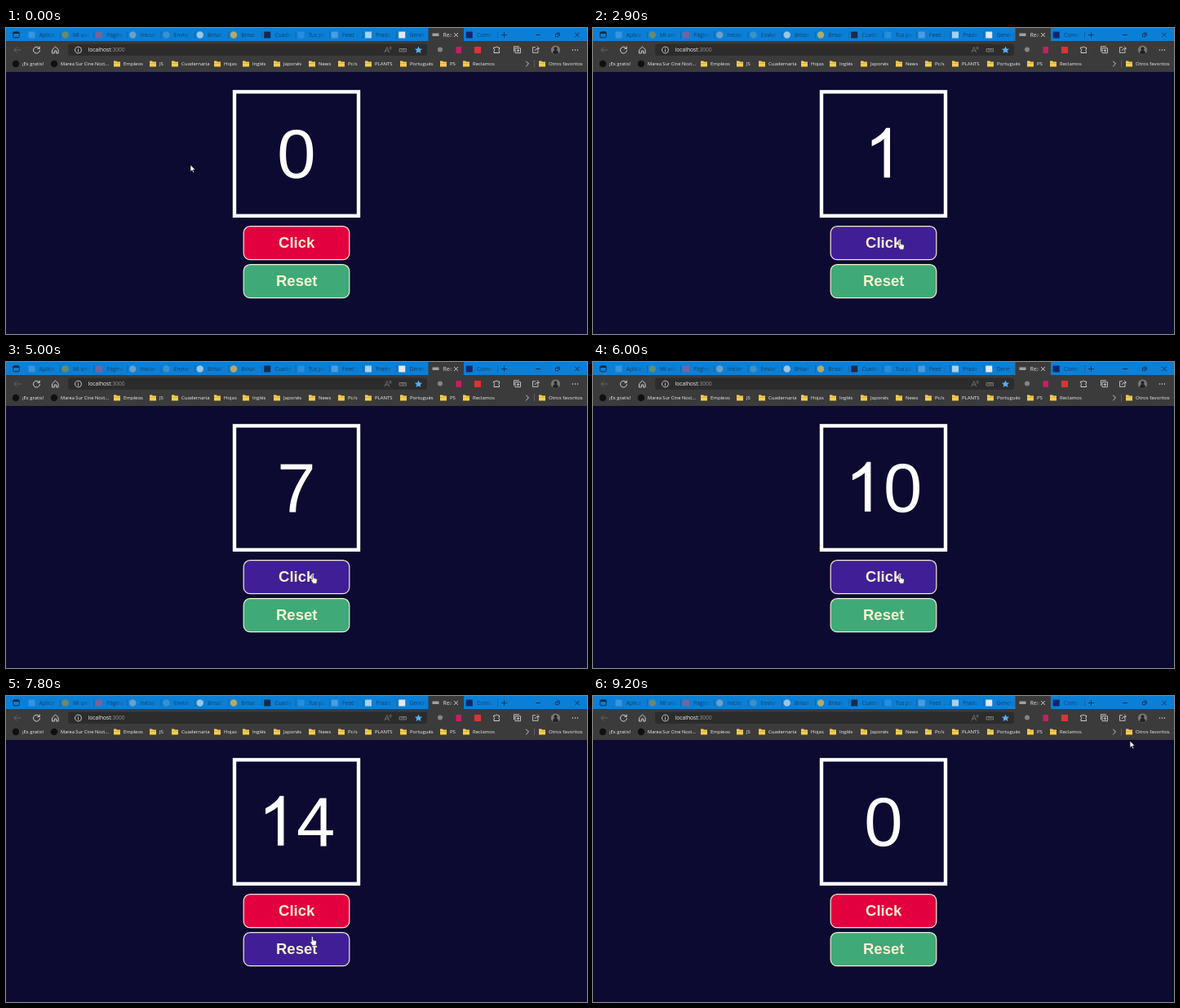
These frames come from a looping animation (712 by 376 pixels, 9.5 s). An HTML page with a canvas:

```html
<!DOCTYPE html>
<html lang="es">
<head>
<meta charset="utf-8">
<title>Contador</title>
<style>
html, body { margin: 0; width: 100%; height: 100%; overflow: hidden; background: #0c0a30; }
canvas { display: block; width: 712px; height: 376px; }
</style>
</head>
<body>
<canvas id="stage" width="712" height="376"></canvas>
<script>
const ctx = document.getElementById('stage').getContext('2d');
const LOOP = 9500, STEP = 100;
const UI = '"Open Sans", "Noto Sans", sans-serif';
const ARIAL = '"Liberation Sans", Arial, sans-serif';
const BLUE = '#0b7fd6', BAR = '#3b3b3b', ICON = '#dedede', DIM = '#858585';

// Moments at which the counter goes up by one
const CLICKS = [2900, 3300, 3500, 4000, 4400, 4500, 5000, 5400, 5600, 6000, 6300, 6600, 6900, 7100];
const RESET_AT = 8500;

// Pointer stops: time, x, y
const PATH = [
  [0, 226, 168], [500, 252.5, 179], [600, 252.5, 179], [700, 253, 179],
  [1200, 253, 179], [1500, 375, 260], [1600, 375, 260], [1700, 376.2, 260.5],
  [7600, 376.2, 260.5], [7900, 375, 307], [8000, 375, 307], [8200, 376.2, 309],
  [8500, 376.2, 309], [9200, 658, 55], [LOOP, 658, 55]
];

const BUTTONS = [
  { label: 'Click', y: 243.5, color: '#e3003f' },
  { label: 'Reset', y: 290.5, color: '#40a978' }
];

// Footless numeral one, in units of 1/2048 em above the baseline
const ONE = new Path2D('M763 0H583V-1147Q518-1085 412-1023T223-930V-1104Q374-1175 487-1276T647-1472H763Z');

// Tabs: label, icon colour, round icon
const TABS = [
  ['Aplica', '#3794df'], ['Mi uni', '#668b70', 1], ['Página', '#7663a0'], ['Iniciar', '#6ba0c6', 1],
  ['Enviar', '#3b91cb', 1], ['Brisal', '#9cc5e4', 1], ['Brisal', '#b3a969', 1], ['Cuader', '#18284f'],
  ['Tus po', '#298ddd'], ['Feed |', '#4b9cde'], ['Prado', '#a6d0f0'], ['Generic', '#e3e8f2'],
  ['Rea', '#a1a1a1'], ['Como', '#12266b']
];
const ACTIVE = 12;

const FOLDERS = [
  [136, 'Empleos'], [180, 'JS'], [207, 'Cuadernaria'], [259, 'Hojas'], [294, 'Inglés'],
  [332, 'Japonés'], [375, 'News'], [411, 'Pc/s'], [444, 'PLANTS'], [487, 'Portugués'],
  [536, 'PS'], [564, 'Reclamos'], [657, 'Otros favoritos']
];

function rect(x, y, w, h, color) {
  ctx.fillStyle = color;
  ctx.fillRect(x, y, w, h);
}

function round(x, y, w, h, r, fill, stroke, line = 1) {
  ctx.beginPath();
  ctx.roundRect(x, y, w, h, r);
  if (fill) { ctx.fillStyle = fill; ctx.fill(); }
  if (stroke) { ctx.strokeStyle = stroke; ctx.lineWidth = line; ctx.stroke(); }
}

function disc(x, y, r, color) {
  ctx.beginPath();
  ctx.arc(x, y, r, 0, Math.PI * 2);
  ctx.fillStyle = color;
  ctx.fill();
}

function stroke(d, x, y, color = ICON, line = 0.9) {
  ctx.save();
  ctx.translate(x, y);
  ctx.strokeStyle = color;
  ctx.lineWidth = line;
  ctx.lineJoin = ctx.lineCap = 'round';
  ctx.stroke(new Path2D(d));
  ctx.restore();
}

function shape(d, x, y, fill, edge) {
  ctx.save();
  ctx.translate(x, y);
  const p = new Path2D(d);
  ctx.fillStyle = fill;
  ctx.fill(p);
  if (edge) { ctx.strokeStyle = edge; ctx.lineWidth = 0.7; ctx.stroke(p); }
  ctx.restore();
}

function text(s, x, y, font, color, align = 'left') {
  ctx.font = font;
  ctx.fillStyle = color;
  ctx.textAlign = align;
  ctx.fillText(s, x, y);
}

function drawTabs() {
  rect(0, 0, 712, 16, BLUE);
  round(8.8, 4.8, 7.4, 7, 1, null, '#102b45');
  rect(9, 5, 7, 2, '#102b45');
  TABS.forEach(([label, color, isRound], i) => {
    const x = 31.5 + i * 41.25, active = i === ACTIVE;
    if (active) rect(x - 9, 0, 43.5, 17, BAR);
    else if (i !== ACTIVE - 1) rect(x + 34.5, 4, 0.6, 9, '#16568d');
    if (active) rect(x - 4, 6.5, 8, 3.5, color);
    else if (isRound) disc(x, 8.5, 4.2, color);
    else rect(x - 4, 4.5, 8, 8, color);
    const tone = active ? '#e8e8e8' : '#093d6a';
    const fade = ctx.createLinearGradient(x + 9, 0, x + (active ? 21 : 32), 0);
    fade.addColorStop(0.5, tone);
    fade.addColorStop(1, active ? BAR : BLUE);
    text(label, x + 9.3, 10.8, '6.6px ' + UI, fade);
  });
  stroke('M-2-2L2 2M2-2L-2 2', 551.5, 8.5, '#eee');
  stroke('M-3 0H3M0-3V3', 610.5, 8.5, '#0a3458');
  stroke('M-2.5 0H2.5', 652, 8.5, '#0a2d4d');
  stroke('M-2.2-1H1V2.2H-2.2ZM-1-2.4H2.4V1', 676, 8.5, '#0a2d4d', 0.8);
  stroke('M-2.4-2.4L2.4 2.4M2.4-2.4L-2.4 2.4', 700, 8.5, '#0a2d4d');
}

function drawToolbar() {
  rect(0, 16, 712, 38, BAR);
  stroke('M4 0H-4M-1-3L-4 0L-1 3', 14, 27, '#686868');
  stroke('M3.4-2A4 4 0 1 0 4 .6M3.7-4V-1.6H1.2', 37.5, 27);
  stroke('M-3.6-.5L0-4L3.6-.5V4H1.2V1H-1.2V4H-3.6Z', 60.5, 27);

  round(76, 19.5, 440, 14.5, 3, '#2c2c2c');
  stroke('M-4 0A4 4 0 1 0 4 0A4 4 0 1 0-4 0M0-.4V2M0-2V-1.9', 88.5, 27, ICON, 0.8);
  const font = '6.7px ' + UI;
  text('localhost', 100.6, 29.3, font, '#f4f4f4');
  const w = ctx.measureText('localhost').width;
  text(':3000', 100.6 + w, 29.3, font, '#969696');
  stroke('M-4 3L-1.2-3.5L1.6 3M-3 1H.6M2-3.5Q3.2-2.4 2-1.2M3.5-4.2Q5-2.4 3.5-.6', 468, 27, DIM, 0.7);
  stroke('M-4-1.5H4V2H-4ZM-2 0H2', 486.5, 27, DIM, 0.9);
  shape('M0-4.6L1.35-1.6L4.6-1.3L2.2.8L2.9 4L0 2.3L-2.9 4L-2.2.8L-4.6-1.3L-1.35-1.6Z', 505.5, 27, '#55b4f2');

  disc(532, 26.5, 3, '#858585');
  rect(551.5, 23, 6.5, 8, '#c51f65');
  rect(574, 23, 8, 8, '#df3333');
  stroke('M-3-2.5H-1A1.4 1.4 0 0 1 1.6-2.5H3.5V-.3A1.4 1.4 0 0 0 3.5 2V4H-3V1.7A1.4 1.4 0 0 0-3-.7Z', 601, 26.5);
  stroke('M-2-2H4V4H-2ZM-4 2V-4H2M1-.5V2.5M-.5 1H2.5', 626.5, 26.7, ICON, 0.8);
  stroke('M-.5-3H-3.5V3.7H3V1M-1 1Q0-2 4-1.6M2-3.8L4.3-1.6L2 .5', 649, 26.7, ICON, 0.8);
  disc(673.5, 27, 5.6, '#777');
  disc(673.5, 25.2, 2, '#222');
  shape('M-3.6 4Q-3 0 0 0Q3 0 3.6 4Q0 6.5-3.6 4', 673.5, 27, '#222');
  for (let i = -1; i < 2; i++) disc(697.5 + i * 3, 27, 0.75, ICON);
}

function drawBookmarks() {
  const font = '6px ' + UI;
  disc(12, 44, 4.2, '#101010');
  text('¡Es gratis!', 19.8, 46, font, '#f2f2f2');
  disc(59, 44, 4.2, '#101010');
  text('Marea Sur Cine Noct...', 67, 46, '5.7px ' + UI, '#f2f2f2');
  for (const [x, label] of FOLDERS) {
    shape('M-4-3.5H-1L0-2.4H4V3.5H-4Z', x, 44, '#f8cd50');
    rect(x - 4, 43, 8, 0.7, '#d4a332');
    text(label, x + 8, 46, font, '#f2f2f2');
  }
  stroke('M-1.5-3L1.5 0L-1.5 3', 639, 44);
  rect(647, 39.5, 0.7, 9, '#6c6c6c');
}

function pointerAt(t) {
  const i = PATH.findIndex((p, n) => t >= p[0] && t < PATH[n + 1][0]);
  const [t0, x0, y0] = PATH[i], [t1, x1, y1] = PATH[i + 1];
  const p = (t - t0) / (t1 - t0), e = p * p * (3 - 2 * p);
  return { x: x0 + (x1 - x0) * e, y: y0 + (y1 - y0) * e };
}

function isOver(b, p) {
  return p.x > 291 && p.x < 421 && p.y > b.y && p.y < b.y + 41;
}

function drawPointer(p, hand) {
  if (hand) {
    shape('M-1 1Q0-.5 1 1V4.5L4.4 5.5Q5.4 6 5.2 7.3L4.5 11.4H.2L-2.6 7.4Q-2.6 6-1 7Z', p.x, p.y + 0.3, '#fff', '#27204a');
    stroke('M1 5V6.5M2.7 5.3V6.8', p.x, p.y, '#70668f', 0.4);
  } else {
    shape('M0 0V8.6L2 6.8L3.5 10L4.8 9.4L3.4 6.3H6Z', p.x, p.y, '#fff', '#11111c');
  }
}

function drawCount(count) {
  const size = 85, base = 183.8, digits = String(count);
  const advance = size * 0.556;
  const gap = digits === '11' ? advance - size * 0.074 : advance; // kerned pair
  let x = 356 - (advance + gap * (digits.length - 1)) / 2;
  for (const d of digits) {
    if (d === '1') {
      ctx.save();
      ctx.translate(x, base);
      ctx.scale(size / 2048, size / 2048);
      ctx.fillStyle = '#fff';
      ctx.fill(ONE);
      ctx.restore();
    } else {
      text(d, x, base, size + 'px ' + ARIAL, '#fff');
    }
    x += gap;
  }
}

function drawApp(t) {
  rect(0, 54, 712, 322, '#0c0a30');
  ctx.strokeStyle = '#fff';
  ctx.lineWidth = 4.4;
  ctx.strokeRect(280, 78.4, 152, 152.4);
  drawCount(t < RESET_AT ? CLICKS.filter(c => c <= t).length : 0);

  const p = pointerAt(t);
  for (const b of BUTTONS) {
    round(291.2, b.y + 0.2, 129.6, 41, 8, isOver(b, p) ? '#401f96' : b.color, '#f4eed6', 1.2);
    text(b.label, 356.2, b.y + 26.8, 'bold 18.5px ' + ARIAL, '#fbf3d3', 'center');
  }
  drawPointer(p, BUTTONS.some(b => isOver(b, p)));
}

function frame() {
  const t = Math.floor(performance.now() % LOOP / STEP) * STEP;
  drawTabs();
  drawToolbar();
  drawBookmarks();
  drawApp(t);
  requestAnimationFrame(frame);
}
requestAnimationFrame(frame);
</script>
</body>
</html>
```
